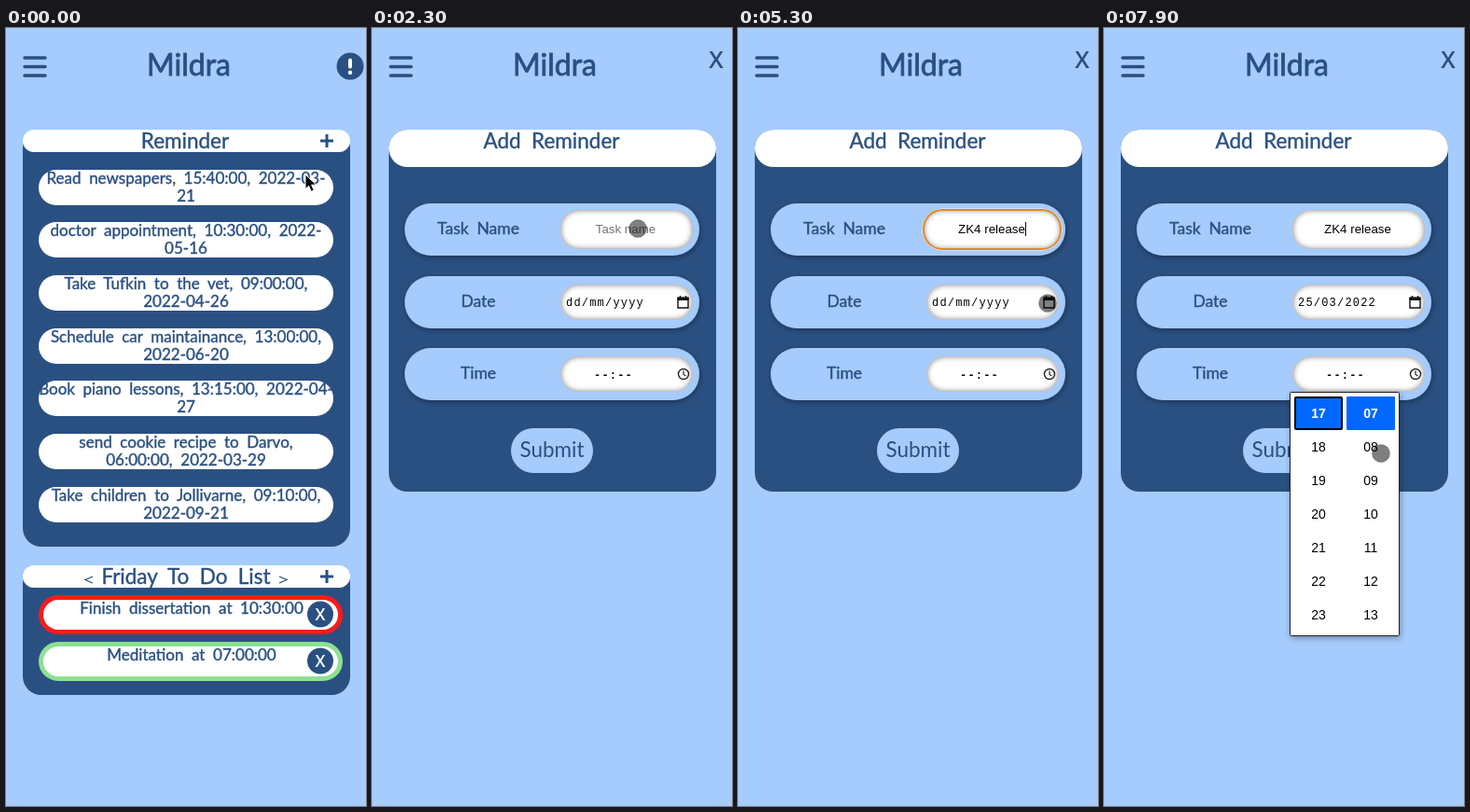
Recreate the animation shown at these times as an HTML page. Size 386x834 px, loop 8000 ms.

```html
<!DOCTYPE html>
<html lang="en">
<head>
<meta charset="utf-8">
<title>Reminder app</title>
<style>
html, body { margin: 0; width: 100%; height: 100%; overflow: hidden; background: #a6cbfd; }
svg { display: block; width: 386px; height: 834px; }
text { font-family: Lato, sans-serif; fill: #2a5082; stroke: #2a5082; stroke-width: .4px; word-spacing: .25em; text-anchor: middle; }
.arial, .mono { font-family: "Liberation Sans", Arial, sans-serif; fill: #000; stroke: none; word-spacing: 0; }
.mono { font-family: "Liberation Mono", monospace; letter-spacing: 1.2px; }
.title { stroke-width: .8px; }
.light { stroke: none; }
.cross { font-family: "Open Sans", sans-serif; font-weight: 600; stroke: none; }
.left { text-anchor: start; }
.white { fill: #fff; }
.grey { fill: #757575; }
.blue { fill: #0068ff; }
.bold { font-weight: 700; }
</style>
</head>
<body>
<svg id="stage" viewBox="0 0 386 834"></svg>
<script>
const NAVY = '#2a5082', SKY = '#a6cbfd', BLUE = '#0068ff';
const LOOP = 8000, STEP = 100;

const rect = (x, y, w, h, r, fill, more = '') =>
  `<rect x="${x}" y="${y}" width="${w}" height="${h}" rx="${r}" fill="${fill}" ${more}/>`;
const text = (x, y, size, str, cls = '', id = '') =>
  `<text x="${x}" y="${y}" font-size="${size}" class="${cls}" id="${id}">${str}</text>`;
const path = (d, width, color = NAVY, more = '') =>
  `<path d="${d}" fill="none" stroke="${color}" stroke-width="${width}" ${more}/>`;
const circle = (x, y, r, fill, more = '') =>
  `<circle cx="${x}" cy="${y}" r="${r}" fill="${fill}" ${more}/>`;
const group = (id, body) => `<g id="${id}">${body}</g>`;
const times = (n, fn) => Array.from({ length: n }, (_, i) => fn(i)).join('');

const defs = `<defs>
  <filter id="inset" x="-20%" y="-50%" width="140%" height="200%" color-interpolation-filters="sRGB">
    <feFlood flood-color="#777"/><feComposite operator="out" in2="SourceAlpha"/>
    <feGaussianBlur stdDeviation="3"/><feComposite operator="in" in2="SourceAlpha" result="edge"/>
    <feMerge><feMergeNode in="SourceGraphic"/><feMergeNode in="edge"/></feMerge>
  </filter>
  <filter id="drop" x="-20%" y="-30%" width="140%" height="160%">
    <feDropShadow dx="1" dy="2" stdDeviation="3" flood-opacity=".35"/>
  </filter></defs>`;

const plus = y => path(`M337 ${y}h14m-7 -7v14`, 3);

const reminders = [
  ['Read newspapers, 15:40:00, 2022-03-', '21'],
  ['doctor appointment, 10:30:00, 2022-', '05-16'],
  ['Take Tufkin to the vet, 09:00:00,', '2022-04-26'],
  ['Schedule car maintainance, 13:00:00,', '2022-06-20'],
  ['Book piano lessons, 13:15:00, 2022-04-', '27'],
  ['send cookie recipe to Darvo,', '06:00:00, 2022-03-29'],
  ['Take children to Jollivarne, 09:10:00,', '2022-09-21']
];

const reminder = ([first, second], i) => {
  const y = Math.floor(152 + i * 56.67);
  return rect(35, y, 316, 38, 19, '#fff') + text(193, y + 15, 17, first) + text(193, y + 34, 17, second);
};

const todo = (y, color, label) =>
  rect(37.5, y + 2.5, 321, 37, 18.5, '#fff', `stroke="${color}" stroke-width="5"`) +
  text(199, y + 20, 17, label) + circle(337, y + 20.5, 14, NAVY) +
  text(337, y + 26.5, 17.5, 'X', 'cross white');

const header = path('M20 32h22M20 41.5h22M20 51h22', 3.5, NAVY, 'stroke-linecap="round"') +
  text(196, 51, 32, 'Mildra', 'title');

const list = circle(369, 41, 14.5, NAVY) +
  path('M369 34.5v7', 4, '#fff', 'stroke-linecap="round"') + circle(369, 47.7, 2.2, '#fff') +
  rect(18, 109, 351, 447, 20, NAVY) + rect(18, 109, 351, 24, 12, '#fff') +
  text(192, 129, 22.5, 'Reminder') + plus(121) + reminders.map(reminder).join('') +
  rect(18, 576, 351, 139, 20, NAVY) + rect(18, 576, 351, 24, 12, '#fff') +
  text(193, 596, 22.5, 'Friday To Do List') + plus(588) +
  path('M93 588l-8 3.5l8 3.5M293 588l8 3.5l-8 3.5', 1.3) +
  todo(608, '#fc1b17', 'Finish dissertation at 10:30:00') +
  todo(658, '#8ee092', 'Meditation at 07:00:00');

const row = (y, label, top, height) =>
  rect(35, y, 316, 56, 28, SKY, 'filter="url(#drop)"') + text(114, y + 33, 17.5, label) +
  rect(202, top, 142, height, 19, '#fff', 'filter="url(#inset)"');

const form = text(369, 43, 25, 'X', 'cross') +
  rect(18, 109, 351, 388, 20, NAVY) + rect(18, 109, 351, 40, 20, '#fff') +
  text(192.5, 128.5, 22.5, 'Add Reminder') +
  row(188, 'Task Name', 195, 42) + row(266, 'Date', 275, 38) + row(343, 'Time', 352, 38) +
  group('focus', rect(197.5, 193.5, 150, 45, 22, '#fff') +
    rect(199, 195, 147, 42, 20, '#fff', 'filter="url(#inset)"') +
    rect(199, 195, 147, 42, 20, 'none', 'stroke="#df8b26" stroke-width="2"')) +
  text(272, 220, 13.33, '', 'arial', 'task') +
  group('caret', path('M0 208v15', 1, '#000')) +
  text(208, 298, 12, '', 'mono left', 'date') +
  path('M328 289.5h11v10.5h-11zM330.5 287v2M336.5 287v2', 1.4, '#111') + rect(327.5, 288.5, 12, 3.5, 0, '#111') +
  text(259, 376, 12, '--:--', 'mono bold') +
  circle(334, 371, 5.5, 'none', 'stroke="#222" stroke-width="1.4"') + path('M334 367.5v4l2.5 1.5', 1.2, '#222') +
  rect(149, 429, 88, 48, 24, SKY) + text(193, 460, 22.5, 'Submit', 'light');

const popup = (y, w, h) =>
  rect(199.5, y, w, h, 1, '#fff', 'stroke="#222" stroke-width="1" filter="url(#drop)"');

// March 2022 with weeks from Monday; the grid opens on 28 February.
const day = i => {
  const x = 224 + i % 7 * 28, y = 394 + Math.floor(i / 7) * 30;
  const n = i === 0 ? 28 : i > 31 ? i - 31 : i;
  const today = i === 25;
  return (today ? rect(x - 13, y - 13, 26, 26, 2, BLUE, 'stroke="#000" stroke-width="1.5"') : '') +
    text(x, y + 4.5, 12.5, n, 'arial ' + (today ? 'white' : i === 0 || i > 31 ? 'grey' : ''));
};
const calendar = popup(313.5, 228, 293) +
  text(212, 342, 13.33, 'March 2022', 'arial bold left') + '<path d="M288 335h8l-4 5z"/>' +
  ['Mo', 'Tu', 'We', 'Th', 'Fr', 'Sa', 'Su'].map((d, i) => text(224 + i * 28, 372, 12, d, 'arial grey')).join('') +
  times(42, day) + text(212, 592, 13, 'Clear', 'arial blue left');

const column = (x, start) => times(7, i =>
  text(x, 418 + i * 36, 14, String(start + i).padStart(2, '0'), 'arial ' + (i ? '' : 'white bold')));
const clock = popup(390.5, 117, 261) +
  rect(205, 396, 50, 34, 1, BLUE, 'stroke="#000" stroke-width="2"') + rect(260, 395, 52, 36, 1, BLUE) +
  column(230, 17) + column(286, 7);

const arrow = '<path d="M0 0v15.5l3.6-3.2 2.6 6 3-1.3-2.6-5.8h5z" fill="#000" stroke="#fff" stroke-width="1"/>';
const touch = circle(0, 0, 9.5, 'rgba(0,0,0,.5)', 'stroke="rgba(0,0,0,.15)" stroke-width="1.5"');

stage.innerHTML = defs + rect(0, 0, 386, 834, 0, SKY) + header + group('list', list) + group('form', form) +
  group('calendar', calendar) + group('clock', clock) + group('arrow', arrow) + group('touch', touch);

const el = id => document.getElementById(id);
const show = (id, on) => el(id).setAttribute('display', on ? 'inline' : 'none');
const place = (id, x, y) => el(id).setAttribute('transform', `translate(${x} ${y})`);

// Pointer path: time, x, y.
const track = [
  [0, 321, 157], [300, 332, 150], [700, 343, 135], [1000, 345, 124], [1500, 345, 124],
  [2200, 285, 215], [5000, 300, 240], [5300, 332, 295], [5600, 333, 295], [6300, 335, 484],
  [6550, 335, 484], [7150, 334, 371], [7500, 334, 371], [7900, 297, 456], [8000, 297, 456]
];
const pointer = t => {
  const i = track.findIndex(k => k[0] > t);
  const [t0, x0, y0] = track[i - 1], [t1, x1, y1] = track[i];
  const u = (t - t0) / (t1 - t0), e = u * u * (3 - 2 * u);
  return [x0 + (x1 - x0) * e, y0 + (y1 - y0) * e];
};

const phrase = 'ZK4 release';
const keys = [3000, 3300, 3700, 3900, 4100, 4200, 4400, 4500, 4700, 4800, 4900];

function draw(t) {
  const between = (a, b) => t >= a && t < b;
  const typed = phrase.slice(0, keys.filter(k => k <= t).length);
  const task = el('task');
  show('list', t < 1400);
  show('form', t >= 1400);
  show('focus', between(2500, 5500));
  show('caret', between(2500, 5500));
  show('calendar', between(5500, 6400));
  show('clock', t >= 7300);
  task.textContent = typed || 'Task name';
  task.setAttribute('class', typed ? 'arial' : 'arial grey');
  place('caret', typed ? 272.5 + task.getComputedTextLength() / 2 : 272.5, 0);
  el('date').textContent = t < 6400 ? 'dd/mm/yyyy' : '25/03/2022';
  show('arrow', t < 1100);
  show('touch', between(1100, 2900) || t >= 5000);
  const [x, y] = pointer(t);
  place('arrow', x, y);
  place('touch', x, y);
}

function tick(now) {
  draw(Math.floor(now % LOOP / STEP) * STEP);
  requestAnimationFrame(tick);
}
requestAnimationFrame(tick);
</script>
</body>
</html>
```
